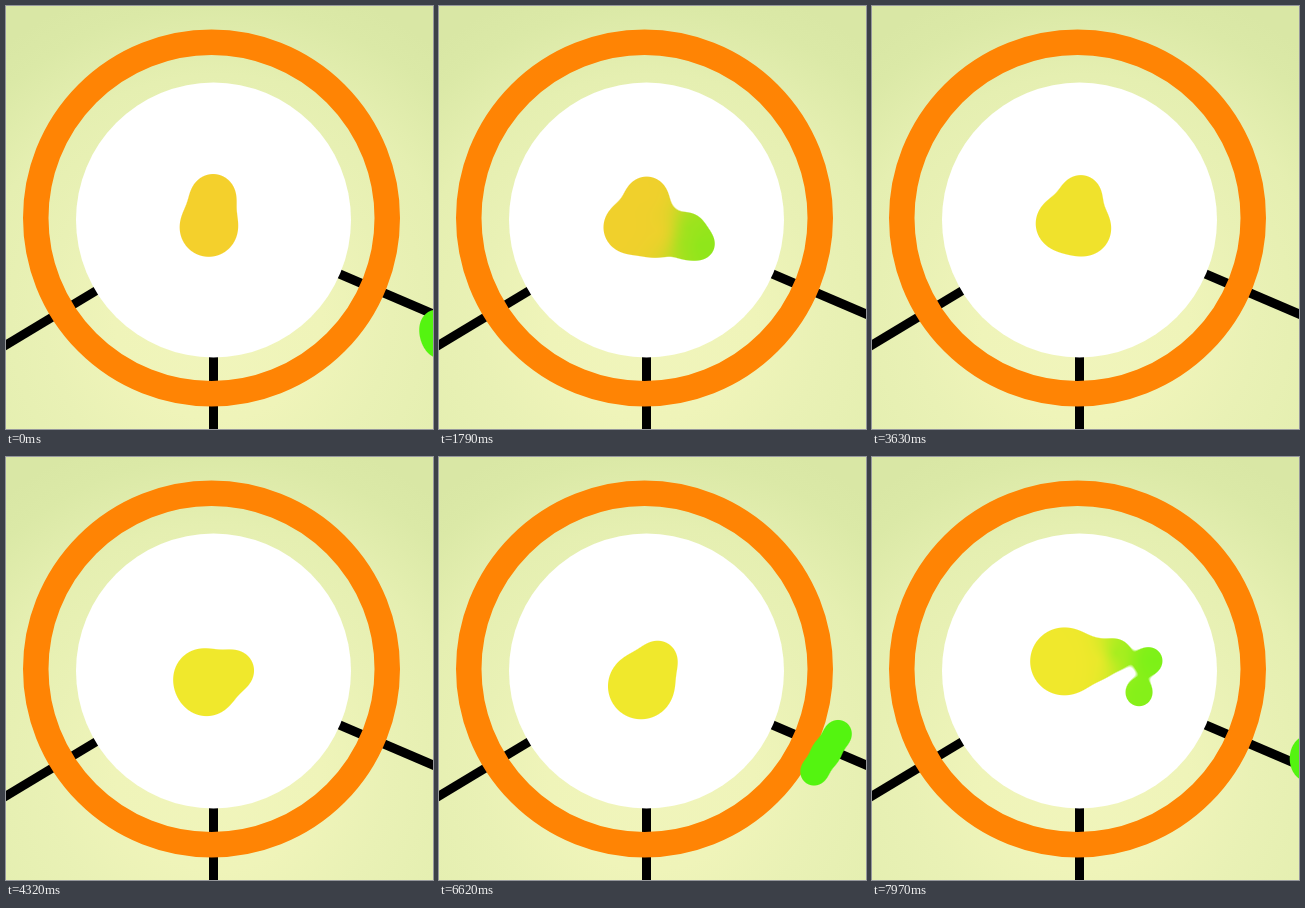
Recreate the animation shown at these times as an HTML page with a canvas. Size 427 by 423 pixels, loop 8000 ms.

```html
<!DOCTYPE html>
<html lang="en">
<head>
<meta charset="utf-8">
<title>Blobs</title>
<style>
  html, body { margin: 0; width: 100%; height: 100%; overflow: hidden; }
  canvas { display: block; width: 427px; height: 423px; }
</style>
</head>
<body>
<canvas id="stage" width="427" height="423"></canvas>
<script>
const W = 427, H = 423, LOOP = 8000;
const SOFT = 7;     // how far neighbouring balls melt together
const BLEND = 10;   // width of the colour transition
const GREEN = [84, 244, 16];

const ctx = document.getElementById('stage').getContext('2d');

function layer() {
  const c = document.createElement('canvas');
  c.width = W;
  c.height = H;
  return c;
}

const clamp = (v, lo = 0, hi = 1) => Math.max(lo, Math.min(hi, v));
const mix = (a, b, u) => a + (b - a) * u;
const rad = deg => deg * Math.PI / 180;

function ease(t, from, to) {
  const u = clamp((t - from) / (to - from));
  return u * u * (3 - 2 * u);
}

// A point `along` a direction and `aside` to its left.
function place(x, y, angle, along, aside, r, color) {
  const c = Math.cos(angle), s = Math.sin(angle);
  return { x: x + along * c + aside * s, y: y + along * s - aside * c, r, color };
}

// A small lobe swings around a big double one while the whole body bobs.
function core(t, color) {
  const bob = clamp(t / 4300) ** 2 * Math.sin(2 * Math.PI * (t - 3720) / 2400);
  const x = 204 + 3 * bob;
  const y = 213 + 9 * bob;
  const angle = rad(-82 + 440 * ease(t, 3350, 7550));
  const spread = t < 5000 ? 15 * Math.sin(Math.PI * t / 5000) : 0;
  const age = t / LOOP;
  return [
    place(x, y, angle, 23, 0, 22 - 5 * age, color),
    place(x, y, angle, -9, spread, 24 + 5 * age, color),
    place(x, y, angle, -9, -spread, 24 + 5 * age, color)
  ];
}

// start: time at the right edge; side and drift: offset from the spoke
const visitors = [
  { start: 0,    pace: 1,    side: 17,  drift: -12, angle: 75,  spin: -11, reach: -10 },
  { start: 5759, pace: 0.81, side: 19,  drift: -21, angle: 162, spin: -57, reach: 23 },
  { start: 8090, pace: 0.9,  side: -13, drift: -12, angle: 90,  spin: -11, reach: 8 }
];

// Three balls in a bending chain speed up towards the centre and dissolve there.
function visitor(v, t, yellow) {
  const age = (t - v.start) / 1000 * v.pace;
  if (age < -0.7 || age > 2.5) return [];
  const a = Math.min(age, 2.1);
  const x = 433 - 44.6 * a - 30.4 * a * a;
  const y = 214 + 0.43 * (x - 207) + v.side + v.drift * a;
  const angle = rad(v.angle + v.spin * a);
  const size = clamp((2.5 - age) / 0.5);
  const reach = v.reach * size;
  const bend = reach * clamp(a - 0.7, 0, 1.1);
  return [[reach, 0], [-reach, 0], [0, bend]].map(([along, aside]) => {
    const ball = place(x, y, angle, along, aside, 13 * size);
    const u = clamp((320 - ball.x) / 170 + Math.max(0, 230 - ball.x) / 60);
    ball.color = GREEN.map((c, k) => mix(c, yellow[k], u));
    return ball;
  });
}

function allBalls(t) {
  const yellow = [mix(244, 240, clamp(t / 1800)), mix(208, 232, ease(t, 2200, 4300)), 44];
  return core(t, yellow).concat(...visitors.map(v => visitor(v, t, yellow)));
}

// Still scenery
const scene = layer();
{
  const g = scene.getContext('2d');
  const glow = g.createRadialGradient(212, 310, 0, 212, 310, 345);
  glow.addColorStop(0, '#f1f5bc');
  glow.addColorStop(0.3, '#eff4b9');
  glow.addColorStop(0.5, '#e9f1b5');
  glow.addColorStop(0.7, '#e5efb1');
  glow.addColorStop(0.9, '#dbe9a7');
  glow.addColorStop(1, '#d9e7a5');
  g.fillStyle = glow;
  g.fillRect(0, 0, W, H);

  g.lineWidth = 9;
  g.strokeStyle = '#000';
  for (const [x, y] of [[-10, 345], [207.5, 433], [437, 312.3]]) {
    g.beginPath();
    g.moveTo(207.5, 214);
    g.lineTo(x, y);
    g.stroke();
  }

  g.fillStyle = '#fff';
  g.beginPath();
  g.arc(207.5, 214, 137.5, 0, Math.PI * 2);
  g.fill();

  g.lineWidth = 25.5;
  g.strokeStyle = '#ff8404';
  g.beginPath();
  g.arc(205.5, 212, 175.75, 0, Math.PI * 2);
  g.stroke();
}

const blobs = layer();
const blobCtx = blobs.getContext('2d');

function drawBlobs(balls) {
  const edge = (key, sign) => balls.map(b => b[key] + sign * (b.r + 14));
  const x0 = Math.floor(clamp(Math.min(...edge('x', -1)), 0, W - 1));
  const y0 = Math.floor(clamp(Math.min(...edge('y', -1)), 0, H - 1));
  const x1 = Math.ceil(clamp(Math.max(...edge('x', 1)), x0 + 1, W));
  const y1 = Math.ceil(clamp(Math.max(...edge('y', 1)), y0 + 1, H));
  const img = blobCtx.createImageData(x1 - x0, y1 - y0);
  const px = img.data;
  let o = 0;

  for (let y = y0; y < y1; y++) {
    for (let x = x0; x < x1; x++, o += 4) {
      let field = 0, sum = 0, r = 0, g = 0, b = 0;
      for (const ball of balls) {
        const dx = x + 0.5 - ball.x, dy = y + 0.5 - ball.y;
        const d = Math.sqrt(dx * dx + dy * dy) - ball.r;
        if (d > 60) continue;
        field += Math.exp(-d / SOFT);
        const w = Math.exp(-d / BLEND);
        sum += w;
        r += w * ball.color[0];
        g += w * ball.color[1];
        b += w * ball.color[2];
      }
      const cover = field > 0 ? 0.5 + SOFT * Math.log(field) : 0;
      if (cover <= 0) continue;
      px[o] = r / sum;
      px[o + 1] = g / sum;
      px[o + 2] = b / sum;
      px[o + 3] = 255 * Math.min(1, cover);
    }
  }
  blobCtx.clearRect(0, 0, W, H);
  blobCtx.putImageData(img, x0, y0);
  ctx.drawImage(blobs, 0, 0);
}

const start = performance.now();

function frame() {
  const t = (performance.now() - start) % LOOP;
  ctx.drawImage(scene, 0, 0);
  drawBlobs(allBalls(t));
  requestAnimationFrame(frame);
}
frame();
</script>
</body>
</html>
```
